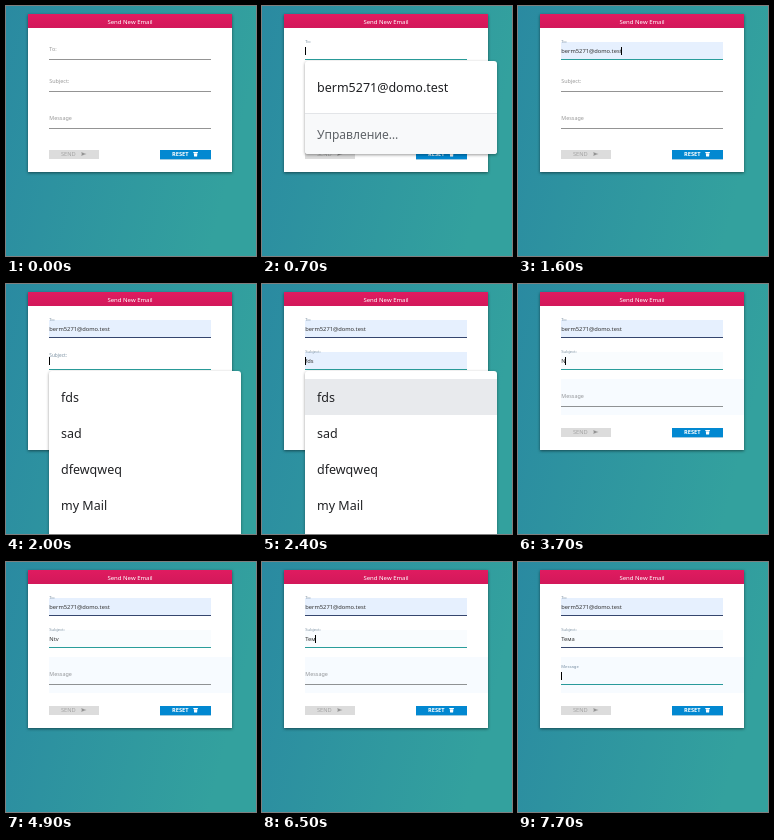
An HTML page that plays this animation: 250x250 px, repeating every 8000 ms.

```html
<!DOCTYPE html>
<html lang="en">
<head>
<meta charset="utf-8">
<title>Send New Email</title>
<style>
  html, body { margin: 0; width: 100%; height: 100%; overflow: hidden; }
  svg { display: block; width: 100%; height: 100%; }
  text { font-family: "Noto Sans", "Open Sans", sans-serif; white-space: pre; }
  .value { font-size: 5.75px; fill: #333; }
  .button { font-size: 5.7px; font-weight: 600; }
  .menu text { font-size: 12.5px; font-weight: 500; fill: #202124; }
  .menu .manage { font-size: 12px; font-weight: 400; fill: #5f6368; }
  .card { filter: drop-shadow(0 1px 1.5px rgba(0, 0, 0, .5)); }
  .menu { filter: drop-shadow(0 1px 1.5px rgba(0, 0, 0, .4)); }
  .raised { filter: drop-shadow(0 .5px .5px rgba(0, 0, 0, .3)); }
</style>
</head>
<body>
<svg viewBox="0 0 250 250">
  <defs>
    <linearGradient id="sea" x2="1" y2=".25">
      <stop stop-color="#2a8aa1"/><stop offset="1" stop-color="#33a19e"/>
    </linearGradient>
    <linearGradient id="bar" x2="0" y2="1">
      <stop stop-color="#e01b60"/><stop offset="1" stop-color="#d2185a"/>
    </linearGradient>
  </defs>
  <rect width="250" height="250" fill="url(#sea)"/>
  <g class="card">
    <rect x="22" y="8" width="204" height="158" fill="#fff"/>
    <rect x="22" y="8" width="204" height="14" fill="url(#bar)"/>
  </g>
  <text x="124" y="18" text-anchor="middle" font-size="6" fill="#fff">Send New Email</text>

  <g id="fields"></g>

  <rect x="43" y="144" width="50" height="9" fill="#dcdcdc"/>
  <text class="button" x="55" y="150.3" fill="#a3a3a3" style="font-weight:400">SEND</text>
  <path d="M75 146l5.5 2-5.5 2 .8-2zM75.8 148h3" fill="#777" stroke="#ddd" stroke-width=".4"/>
  <rect class="raised" x="154" y="144" width="51" height="9.3" fill="#0288d1"/>
  <text class="button" x="166" y="150.3" fill="#fff">RESET</text>
  <path d="M187.3 146h4.6v.9h-4.6zM187.8 147.2h3.6l-.3 3.2h-3z" fill="#fff"/>

  <g class="menu" id="emailMenu">
    <rect x="43" y="55" width="192" height="93" rx="3" fill="#fff"/>
    <rect id="emailHover" x="43" y="63" width="192" height="36" fill="#e8eaed"/>
    <path d="M43 107.5h192v37.500a3 3 0 0 1-3 3h-186a3 3 0 0 1-3-3z" fill="#f8f9fa"/>
    <path d="M43 107.5h192" stroke="#e3e5e8"/>
    <text id="suggestion" x="55" y="86"></text>
    <text class="manage" x="55" y="133">Управление…</text>
  </g>
  <g class="menu" id="subjectMenu">
    <rect x="43" y="87" width="192" height="180" rx="3" fill="#fff"/>
    <rect id="subjectHover" x="43" y="95" width="192" height="36" fill="#e8eaed"/>
  </g>
  <rect id="tint" x="43" y="95" height="36" fill="#f7fbff" style="mix-blend-mode:multiply"/>
</svg>
<script>
const LOOP = 8000;
const EMAIL = "berm5271@domo.test";
const TO = 0, SUBJECT = 1, MESSAGE = 2;
const $ = id => document.getElementById(id);

function add(parent, tag, attrs, content = "") {
  const node = document.createElementNS("http://www.w3.org/2000/svg", tag);
  for (const key in attrs) node.setAttribute(key, attrs[key]);
  node.textContent = content;
  parent.append(node);
  return node;
}
const show = (node, on) => node.setAttribute("visibility", on ? "visible" : "hidden");

const fields = [["To:", 53], ["Subject:", 85], ["Message", 122]].map(([name, base]) => {
  const group = $("fields");
  return {
    base,
    fill: add(group, "rect", { x: 43, y: base - 17, width: 162, height: 17 }),
    line: add(group, "rect", { x: 43, y: base, width: 162, height: 1 }),
    label: add(group, "text", { x: 43.3 }, name),
    value: add(group, "text", { x: 43.3, y: base - 6, class: "value" }),
  };
});
const caret = add($("fields"), "rect", { width: 1, height: 8, fill: "#000" });

$("suggestion").textContent = EMAIL;
["fds", "sad", "dfewqweq", "my Mail"].forEach((word, i) =>
  add($("subjectMenu"), "text", { x: 55, y: 118 + 36 * i }, word));

// Each step keeps whatever the previous ones set.
const steps = [
  [0, { focus: -1, caret: false, home: false, to: "", subject: "", menu: "", hover: false }],
  [700, { focus: TO, caret: true, menu: "email" }],
  [1100, { caret: false }],
  [1300, { to: EMAIL, hover: true }],
  [1600, { caret: true, menu: "", hover: false }],
  [2000, { focus: SUBJECT, menu: "subject" }],
  [2400, { subject: "fds", hover: true, home: true }],
  [2500, { subject: "", hover: false, home: false }],
  [2900, { caret: false }],
  [3400, { caret: true }],
  [3700, { subject: "N", menu: "" }],
  [4000, { subject: "Nt" }],
  [4200, { subject: "Ntv" }],
  [4400, { subject: "Ntvf" }],
  [4900, { subject: "Ntv", caret: false }],
  [5100, { subject: "Nt" }],
  [5200, { subject: "N" }],
  [5400, { subject: "", caret: true }],
  [5900, { caret: false }],
  [6000, { subject: "Т", caret: true }],
  [6300, { subject: "Те" }],
  [6500, { subject: "Тем" }],
  [6600, { subject: "Тема" }],
  [7100, { caret: false }],
  [7500, { focus: MESSAGE, caret: true }],
];
const floatStart = [700, 2000, 7500];
const floatTime = [0, 100, 200];

function floated(i, t) {
  if (t < floatStart[i]) return 0;
  const k = floatTime[i] ? Math.min(1, (t - floatStart[i] + 30) / floatTime[i]) : 1;
  return 1 - (1 - k) ** 2;
}

function draw(t) {
  const state = {};
  for (const [start, change] of steps) if (start <= t) Object.assign(state, change);
  const values = [state.to, state.subject, ""];
  const ghost = t >= 2500;

  fields.forEach((field, i) => {
    const up = floated(i, t), focused = state.focus === i;
    field.label.setAttribute("y", field.base - 8 - 8 * up);
    field.label.setAttribute("font-size", 5.4 - 1.2 * up);
    field.label.setAttribute("fill", up ? "#7d92a3" : "#999");
    field.value.textContent = values[i];
    const fill = i === TO && state.to || state.subject === "fds" && i === SUBJECT ? "#e6f0fe"
      : i === SUBJECT && ghost ? "#f9fcfe" : "none";
    field.fill.setAttribute("fill", fill);
    field.line.setAttribute("fill", focused ? "#2a9d9b" : values[i] ? "#35466e" : "#949494");
  });

  const active = fields[Math.max(0, state.focus)];
  show(caret, state.caret);
  caret.setAttribute("x", 43 + (state.home ? 0 : Math.floor(active.value.getComputedTextLength())));
  caret.setAttribute("y", active.base - 12);

  for (const name of ["email", "subject"]) {
    show($(name + "Menu"), state.menu === name);
    show($(name + "Hover"), state.menu === name && state.hover);
  }
  show($("tint"), ghost);
  $("tint").setAttribute("width", state.menu ? 192 : 183);
}

function tick() {
  draw(performance.now() % LOOP);
  requestAnimationFrame(tick);
}
tick();
</script>
</body>
</html>
```
